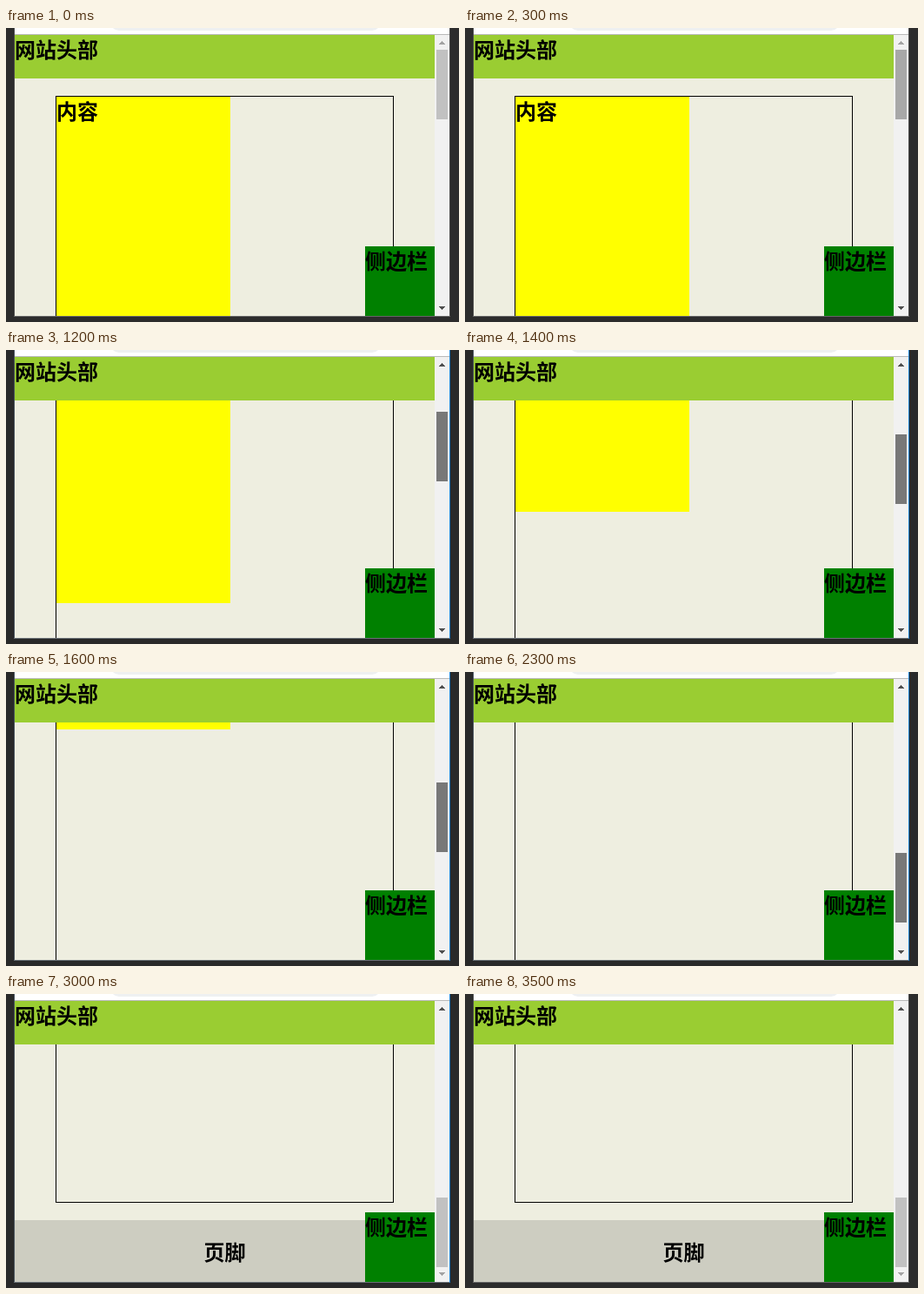
An HTML page with a canvas for the animation above (3.6 s loop, 521x338 px).

```html
<!DOCTYPE html>
<html lang="zh-CN">
<head>
<meta charset="utf-8">
<title>固定布局</title>
<style>
html, body { margin: 0; width: 100%; height: 100%; overflow: hidden; background: #2b2b2b; }
canvas { display: block; width: 521px; height: 338px; }
</style>
</head>
<body>
<canvas id="stage" width="521" height="338"></canvas>
<script>
const ctx = document.getElementById('stage').getContext('2d');
const LOOP = 3600, STEP = 100;
const MAX_SCROLL = 840, MAX_DRAG = 209;

// [time in ms, thumb travel in px]
const DRAG = [[800, 0], [900, 7], [1400, 73], [1600, 103], [2000, 151], [2300, 184], [2500, MAX_DRAG]];

function dragAt(t) {
  if (t <= DRAG[0][0]) return 0;
  for (let i = 1; i < DRAG.length; i++) {
    const [t0, d0] = DRAG[i - 1], [t1, d1] = DRAG[i];
    if (t <= t1) return Math.round(d0 + (d1 - d0) * (t - t0) / (t1 - t0));
  }
  return MAX_DRAG;
}

function thumbColor(t) {
  if (t < 300 || t >= 3000) return '#c1c1c1';
  return t < 900 || t >= 2800 ? '#a8a8a8' : '#787878';
}

function rect(x, y, w, h, color) {
  ctx.fillStyle = color;
  ctx.fillRect(x, y, w, h);
}

function label(text, x, y) {
  ctx.fillStyle = '#000';
  ctx.fillText(text, x, y);
}

function arrow(y, dir, enabled) {
  const color = enabled ? '#505050' : '#a3a3a3';
  for (let i = 0; i < 4; i++) rect(501 - i, y + dir * i, 1 + 2 * i, 1, color);
}

function drawWindow(active) {
  rect(0, 0, 521, 338, active ? '#292929' : '#2c2c2c');
  rect(9, 0, 502, 332, active ? '#48525c' : '#4a4a4a');
  rect(9, 331, 502, 1, active ? '#6b7278' : '#666');
  if (active) rect(510, 0, 1, 332, '#1a7fd0');
  rect(10, 0, 500, 7, '#fff');
  ctx.fillStyle = '#eef0f1';
  ctx.beginPath();
  ctx.roundRect(120, -20, 311, 23, 10);
  ctx.fill();
  rect(10, 7, 500, 1, '#b9b9b9');
}

function drawPage(scroll) {
  ctx.save();
  ctx.beginPath();
  ctx.rect(10, 8, 483, 323);
  ctx.clip();
  rect(10, 8, 483, 323, '#eeeee0');

  ctx.save();
  ctx.translate(0, -scroll);
  ctx.strokeStyle = '#000';
  ctx.lineWidth = 1;
  ctx.strokeRect(57.5, 78.5, 388, 1001);
  rect(58, 79, 200, 400, '#ff0');
  label('内容', 58, 105);
  rect(10, 1100, 483, 71, '#cdcdc1');
  label('页脚', 227.5, 1146);
  ctx.restore();

  rect(10, 8, 483, 50, '#9acd32');
  label('网站头部', 10, 34);
  rect(413, 251, 80, 80, '#008000');
  label('侧边栏', 413, 277);
  ctx.restore();
}

function drawScrollbar(scroll, color) {
  rect(493, 8, 17, 323, '#f1f1f1');
  arrow(15, 1, scroll > 0);
  arrow(323, -1, scroll < MAX_SCROLL);
  rect(495, 25 + Math.floor(scroll * MAX_DRAG / MAX_SCROLL), 13, 80, color);
}

function draw(t) {
  const scroll = Math.floor(dragAt(t) * MAX_SCROLL / MAX_DRAG);
  ctx.font = 'bold 24px "Noto Sans CJK SC", "Noto Sans CJK", sans-serif';
  drawWindow(t >= 900 && t < 3500);
  drawPage(scroll);
  drawScrollbar(scroll, thumbColor(t));
}

const start = performance.now();
function tick() {
  const t = (performance.now() - start) % LOOP;
  draw(Math.floor(t / STEP) * STEP);
  requestAnimationFrame(tick);
}
tick();
</script>
</body>
</html>
```
